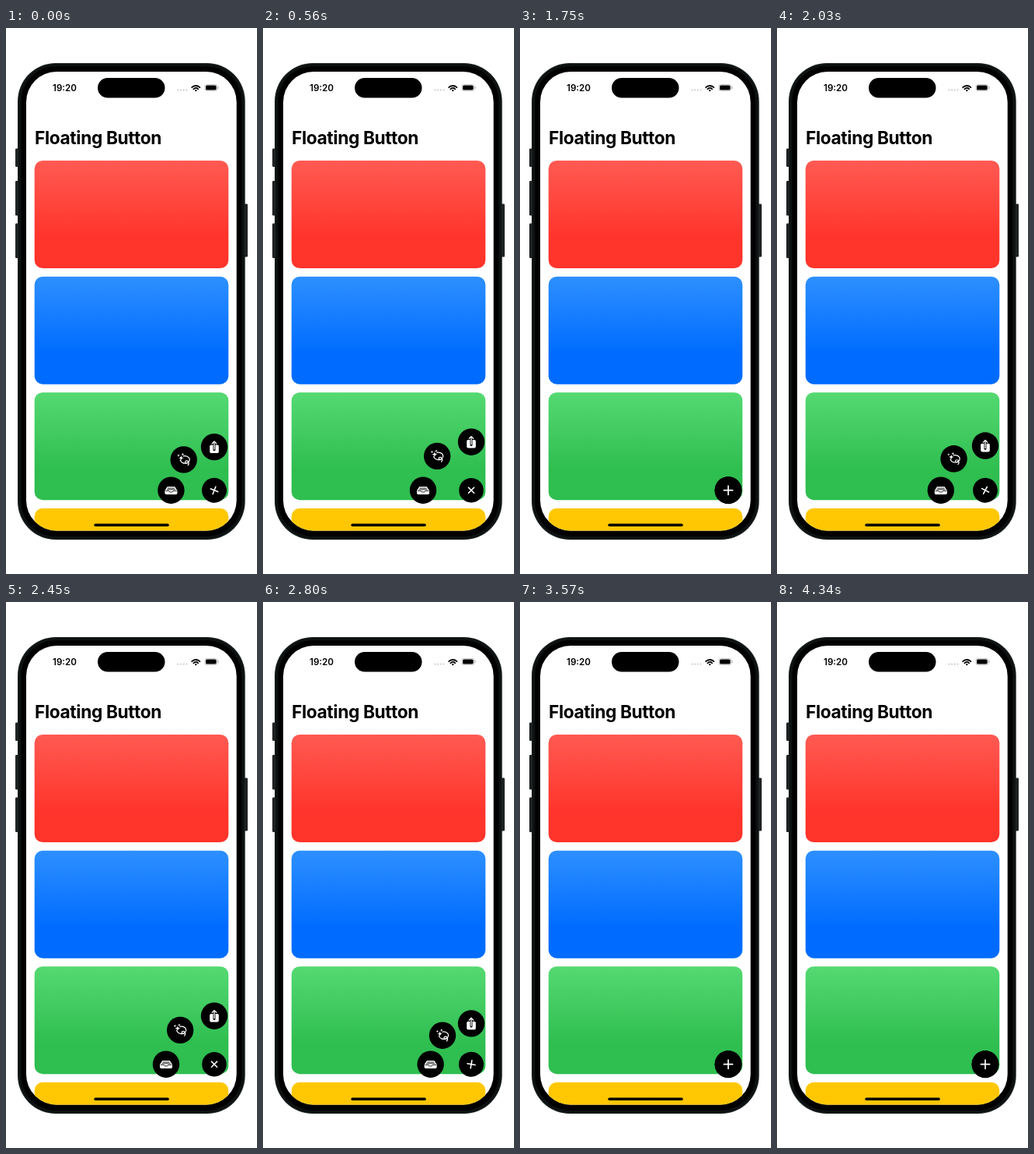
Recreate the animation shown at these times as an HTML page with a canvas. Size 323 by 700 pixels, loop 5320 ms.

```html
<!DOCTYPE html>
<html lang="en">
<head>
<meta charset="utf-8">
<title>Floating Button</title>
<style>
  html, body { margin: 0; width: 100%; height: 100%; overflow: hidden; background: #fff; }
  canvas { display: block; width: 323px; height: 700px; }
</style>
</head>
<body>
<canvas id="stage"></canvas>
<script>
const W = 323, H = 700, LOOP = 5320, STEP = 70, LAST = 4340;
const canvas = document.getElementById('stage');
const ctx = canvas.getContext('2d');
const dpr = window.devicePixelRatio || 1;
canvas.width = W * dpr;
canvas.height = H * dpr;

const FONT = 'Inter, Roboto, sans-serif';
const HUB = { x: 268, y: 592.7 };
const REACH = 62;

// Tap times; each one toggles the menu.
const TAPS = [
  { at: -201, open: true },
  { at: 1057, open: false },
  { at: 1815, open: true },
  { at: 2757, open: false }
];

const CARDS = [
  { y: 170, from: '#ff5a52', to: '#ff342b' },
  { y: 318.7, from: '#2d8fff', to: '#006cff' },
  { y: 467.2, from: '#55d972', to: '#2fbe50' },
  { y: 615.7, from: '#ffc803', to: '#ffc400' }
];

// Share of the way still to go, s seconds into a lightly bouncing spring.
function springRest(s) {
  const zeta = 0.85, w = 2 * Math.PI / 0.4;
  const damp = Math.sqrt(1 - zeta * zeta);
  const a = w * damp * s;
  return Math.exp(-zeta * w * s) * (Math.cos(a) + zeta / damp * Math.sin(a));
}

function progressAt(t) {
  const tap = TAPS.filter(k => k.at <= t).pop();
  const rest = springRest((t - tap.at) / 1000);
  return tap.open ? 1 - rest : rest;
}

function box(x, y, w, h, r, fill) {
  ctx.beginPath();
  ctx.roundRect(x, y, w, h, r);
  ctx.fillStyle = fill;
  ctx.fill();
}

function disc(x, y, r, fill) {
  ctx.beginPath();
  ctx.arc(x, y, r, 0, 2 * Math.PI);
  ctx.fillStyle = fill;
  ctx.fill();
}

function line(points, color, width) {
  ctx.beginPath();
  points.forEach(([x, y]) => ctx.lineTo(x, y));
  ctx.strokeStyle = color;
  ctx.lineWidth = width;
  ctx.stroke();
}

function at(x, y, draw) {
  ctx.save();
  ctx.translate(x, y);
  draw();
  ctx.restore();
}

function text(str, x, y, font, spacing) {
  ctx.font = font;
  ctx.letterSpacing = spacing;
  ctx.fillStyle = '#000';
  ctx.fillText(str, x, y);
}

function drawBody() {
  const side = '#202323';
  box(12, 154.5, 5, 23.5, 1.2, side);
  box(12, 196, 5, 44.5, 1.2, side);
  box(12, 250.5, 5, 44.5, 1.2, side);
  box(306, 225.5, 5, 68, 1.2, side);
  box(15, 45, 292.7, 611, 49, '#1b2221');
  box(16.2, 46.2, 290.3, 608.6, 48, '#0d1111');
  box(19.5, 49.2, 283.7, 602.6, 45, '#000');
}

function drawStatus() {
  text('19:20', 60, 81.2, `600 11.6px ${FONT}`, '0px');
  box(118, 64, 86.5, 25.5, 12.75, '#000');
  for (let i = 0; i < 4; i++) disc(221.4 + i * 3.7, 79.6, 0.9, '#b8b8b8');

  at(244.3, 81, () => {
    disc(0, -0.9, 1.2, '#000');
    [4, 7].forEach(r => {
      ctx.beginPath();
      ctx.arc(0, 0, r, -Math.PI * 0.76, -Math.PI * 0.24);
      ctx.strokeStyle = '#000';
      ctx.lineWidth = 1.8;
      ctx.stroke();
    });
  });

  box(255.6, 72.2, 16.4, 8.6, 2.7, '#aaa');
  box(256.2, 72.8, 15.2, 7.4, 2.2, '#fff');
  box(257, 73.4, 13.6, 6.2, 1.7, '#000');
  box(272.5, 75, 1.1, 3, 0.6, '#aaa');
}

function drawScreen() {
  ctx.save();
  ctx.beginPath();
  ctx.roundRect(26, 56, 270.7, 588.5, 39);
  ctx.fillStyle = '#fff';
  ctx.fill();
  ctx.clip();
  CARDS.forEach(({ y, from, to }) => {
    const g = ctx.createLinearGradient(0, y, 0, y + 138);
    g.addColorStop(0, from);
    g.addColorStop(0.72, to);
    g.addColorStop(1, to);
    box(36.7, y, 249.6, 138, 10.5, g);
  });
  ctx.restore();
  drawStatus();
  text('Floating Button', 37, 149, `700 22.7px ${FONT}`, '-0.35px');
  box(113.3, 635.4, 96.5, 3.6, 1.8, '#000');
}

function star(x, y, r) {
  ctx.beginPath();
  ctx.moveTo(x, y - r);
  ctx.quadraticCurveTo(x, y, x + r, y);
  ctx.quadraticCurveTo(x, y, x, y + r);
  ctx.quadraticCurveTo(x, y, x - r, y);
  ctx.quadraticCurveTo(x, y, x, y - r);
  ctx.fillStyle = '#fff';
  ctx.fill();
}

function trayIcon() {
  ctx.beginPath();
  ctx.moveTo(-4.8, -4.7);
  ctx.lineTo(4.8, -4.7);
  ctx.lineTo(8, 0.2);
  ctx.lineTo(8, 3.6);
  ctx.quadraticCurveTo(8, 5.4, 6.2, 5.4);
  ctx.lineTo(-6.2, 5.4);
  ctx.quadraticCurveTo(-8, 5.4, -8, 3.6);
  ctx.lineTo(-8, 0.2);
  ctx.closePath();
  ctx.fillStyle = '#fff';
  ctx.fill();
  line([[-4.2, -2.7], [4.2, -2.7]], '#000', 0.9);
  line([[-5.4, -0.9], [5.4, -0.9]], '#000', 0.8);
  line([[-7, 0.7], [-2.7, 0.7], [-1.8, 2.2], [1.8, 2.2], [2.7, 0.7], [7, 0.7]], '#000', 0.8);
}

function lassoIcon() {
  ctx.strokeStyle = '#fff';
  ctx.lineWidth = 1.2;
  ctx.beginPath();
  ctx.ellipse(1.6, 0, 6, 4.7, 0, -Math.PI * 0.6, Math.PI * 0.98);
  ctx.stroke();
  ctx.beginPath();
  ctx.ellipse(3.9, 3, 2, 1.5, 0, 0, 2 * Math.PI);
  ctx.stroke();
  ctx.beginPath();
  ctx.moveTo(5.9, 3.4);
  ctx.quadraticCurveTo(7.4, 5, 5.4, 7.2);
  ctx.stroke();
  star(-3.3, -2.2, 3.8);
  star(-6.7, -5.4, 1.9);
  star(-1.2, -6.6, 2);
}

function shareIcon() {
  box(-5.8, -2.7, 11.6, 10.6, 1.8, '#fff');
  line([[0, -4], [0, 3.7]], '#000', 3);
  line([[0, -6.5], [0, 3]], '#fff', 1.3);
  line([[-2.7, -4.4], [0, -7.1], [2.7, -4.4]], '#fff', 1.3);
}

function drawMenu(p) {
  [trayIcon, lassoIcon, shareIcon].forEach((icon, i) => {
    const angle = i * Math.PI / 4;
    const x = HUB.x - REACH * p * Math.cos(angle);
    const y = HUB.y - REACH * p * Math.sin(angle);
    at(x, y, () => {
      disc(0, 0, 17.2, '#000');
      icon();
    });
  });
  at(HUB.x, HUB.y, () => {
    const size = 1 - 0.1 * p;
    ctx.scale(size, size);
    ctx.rotate(p * 225 * Math.PI / 180);
    disc(0, 0, 17.5, '#000');
    line([[-5.6, 0], [5.6, 0]], '#fff', 1.7);
    line([[0, -5.6], [0, 5.6]], '#fff', 1.7);
  });
}

function render(now) {
  const t = Math.min(Math.floor((now % LOOP) / STEP) * STEP, LAST);
  ctx.setTransform(dpr, 0, 0, dpr, 0, 0);
  ctx.fillStyle = '#fff';
  ctx.fillRect(0, 0, W, H);
  ctx.lineCap = 'round';
  ctx.lineJoin = 'round';
  drawBody();
  drawScreen();
  drawMenu(progressAt(t));
}

let start;
function frame(now) {
  if (start === undefined) start = now;
  render(now - start);
  requestAnimationFrame(frame);
}
render(0);
requestAnimationFrame(frame);
</script>
</body>
</html>
```
